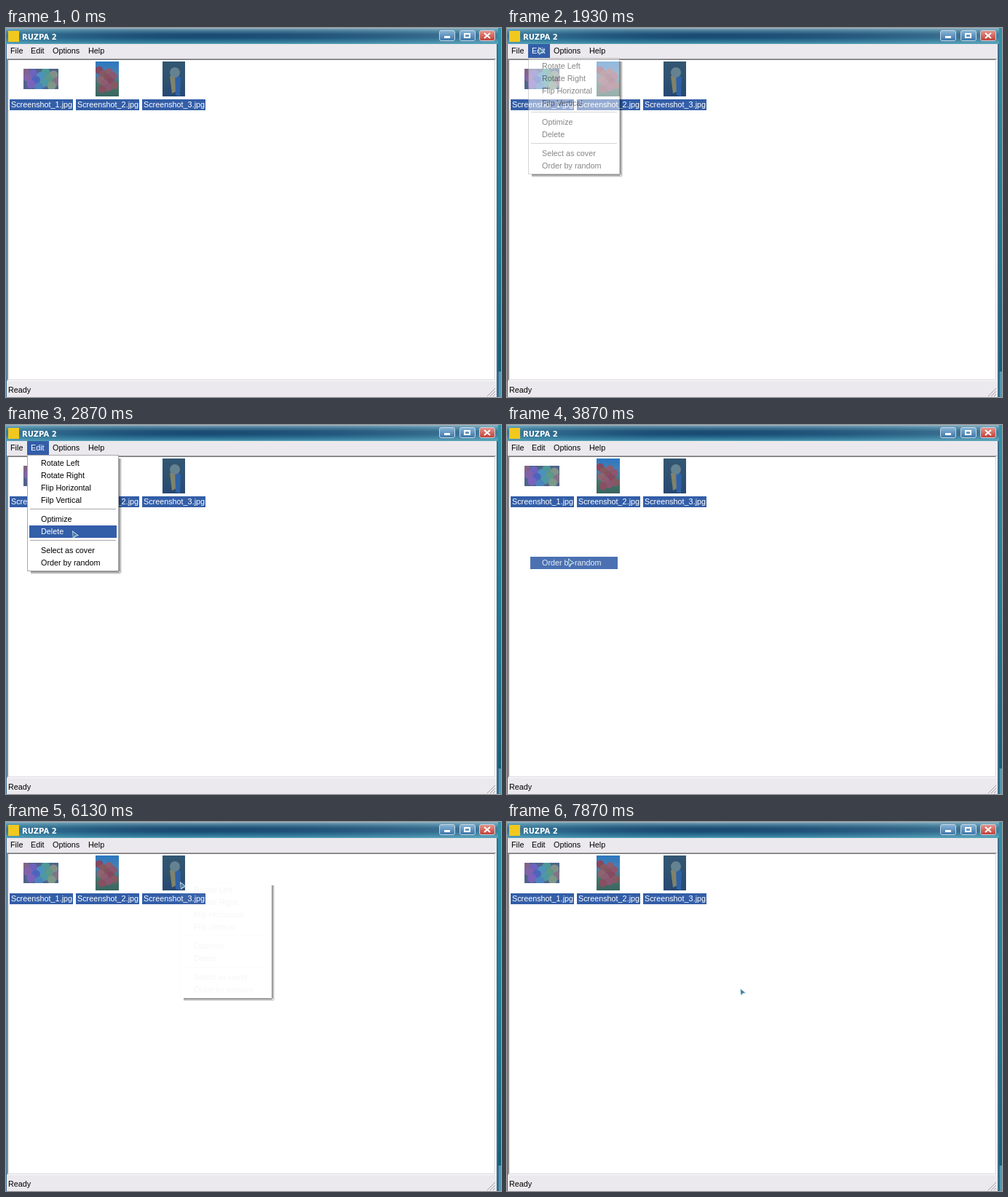
These frames come from a looping animation (680x507 px, 8000 ms). An HTML page with a canvas:

```html
<!DOCTYPE html>
<html lang="en">
<head>
<meta charset="utf-8">
<title>Image manager</title>
<style>
html, body { margin: 0; height: 100%; overflow: hidden; }
canvas { display: block; }
</style>
</head>
<body>
<canvas id="stage" width="680" height="507"></canvas>
<script>
const ctx = document.getElementById('stage').getContext('2d');
const LOOP = 8000, FPS = 15;
const FACE = '#ebe9ed', SELECT = '#335ea8', LINE = '#a7a6aa';
const ROW = 17, GAP = 9, MENU_W = 126, MENU_H = 160, SHADOW = 4;

const GROUPS = [
  ['Rotate Left', 'Rotate Right', 'Flip Horizontal', 'Filp Vertical'],
  ['Optimize', 'Delete'],
  ['Select as cover', 'Order by random']
];
const ITEMS = GROUPS.flatMap((group, g) => group.map(label => ({ label, g })))
  .map(({ label, g }, i) => ({ label, top: 3 + i * ROW + g * GAP }));
const CHOSEN = ITEMS.at(-1);

// Pointer moves in steps; each slows down along a curve bent towards `via`
const START = [680, 507];
const MOVES = [
  { from: 5, to: 18, at: [45, 19], via: [200, 60] },
  { from: 18, to: 21, at: [45, 34] },
  { from: 21, to: 23, at: [43, 26] },
  { from: 35, to: 53, at: [84, 183], via: [110, 130] },
  { from: 73, to: 81, at: [262, 95], via: [81, 192] },
  { from: 81, to: 85, at: [239, 82] },
  { from: 97, to: 107, at: [320, 228], via: [345, 264] }
];
// A menu fades in over `fade` steps; the chosen item lingers for `linger` steps
const MENUS = [
  { x: 29, y: 41, open: 25, fade: 7, close: 58, linger: 5 },
  { x: 239, y: 82, open: 92, fade: 3, close: 114, linger: 4 }
];

function rect(x, y, w, h, fill) {
  ctx.fillStyle = fill;
  ctx.fillRect(x, y, w, h);
}

function text(str, x, y, fill = '#000', font = '10.8px "Liberation Sans", sans-serif') {
  ctx.font = font;
  ctx.fillStyle = fill;
  ctx.fillText(str, x, y);
}

function shape(fill, ...points) {
  ctx.fillStyle = fill;
  ctx.beginPath();
  points.forEach(([x, y]) => ctx.lineTo(x, y));
  ctx.closePath();
  ctx.fill();
}

function dot(x, y, r, fill) {
  ctx.fillStyle = fill;
  ctx.beginPath();
  ctx.arc(x, y, r, 0, 7);
  ctx.fill();
}

// Evenly scattered dots inside a box
function scatter(n, x, y, w, h, r, color) {
  for (let i = 0; i < n; i++) dot(x + w * (i * .618 % 1), y + h * i / (n - 1), r, color(i));
}

function vertical(y0, y1, ...colors) {
  const g = ctx.createLinearGradient(0, y0, 0, y1);
  colors.forEach((color, i) => g.addColorStop(i / (colors.length - 1), color));
  return g;
}

function captionButton(x, top, bottom) {
  ctx.beginPath();
  ctx.roundRect(x + .5, 3.5, 21, 14, 2.5);
  ctx.fillStyle = vertical(3, 18, top, bottom);
  ctx.fill();
  ctx.strokeStyle = '#c3d7e5';
  ctx.lineWidth = 1;
  ctx.stroke();
}

function titleBar() {
  rect(0, 0, 676, 22, vertical(0, 22, '#9fb9c6', '#457d9a', '#1d4d74', '#1a5078', '#2c7798', '#58a4ba'));
  const sheen = ctx.createLinearGradient(0, 0, 676, 0);
  sheen.addColorStop(0, '#58a5c080');
  sheen.addColorStop(.4, '#10366020');
  sheen.addColorStop(1, '#79b8cc70');
  rect(0, 1, 676, 20, sheen);
  rect(3, 4, 15, 15, '#f2c81e');
  text('RUZPA 2', 22, 16, '#fff', 'bold 10px "DejaVu Sans", sans-serif');
  captionButton(595, '#8db8d8', '#3872a8');
  captionButton(623, '#8db8d8', '#3872a8');
  captionButton(650, '#e89a90', '#bd3a32');
  rect(602, 11, 8, 3, '#fff');
  ctx.strokeStyle = '#fff';
  ctx.lineWidth = 2;
  ctx.strokeRect(630, 8, 7, 5);
  ctx.beginPath();
  ctx.moveTo(657, 7); ctx.lineTo(665, 14);
  ctx.moveTo(665, 7); ctx.lineTo(657, 14);
  ctx.stroke();
}

// Selected thumbnail: the picture under a half-transparent selection tint
function thumbnail(i, w, h, paint) {
  const left = 5 + i * 91, x = Math.round(left + 43 - w / 2), y = 70 - h / 2;
  ctx.save();
  ctx.beginPath();
  ctx.rect(x, y, w, h);
  ctx.clip();
  paint(x, y);
  rect(x, y, w, h, SELECT + '80');
  ctx.restore();
  rect(left, 98, 87, 15, SELECT);
  text(`Screenshot_${i + 1}.jpg`, left + 2, 109, '#fff');
}

function thumbnails() {
  thumbnail(0, 48, 28, (x, y) => {
    rect(x, y, 48, 28, '#6a6a6a');
    scatter(13, x + 2, y + 3, 46, 22, 6, i => `hsl(${i * 137}, 55%, 62%)`);
  });
  thumbnail(1, 32, 48, (x, y) => {
    rect(x, y, 32, 48, vertical(y, y + 48, '#2592d6', '#5aa5c8', '#5c8a2c', '#3f6e18'));
    scatter(11, x + 5, y + 12, 22, 26, 5.5, i => `hsl(${8 + i % 3 * 5}, 78%, ${48 + i % 2 * 8}%)`);
  });
  thumbnail(2, 31, 48, (x, y) => {
    rect(x, y, 31, 48, vertical(y, y + 48, '#33503c', '#2c4638', '#1d3340'));
    shape('#d0a92c', [x + 10, y + 20], [x + 19, y + 18], [x + 21, y + 40], [x + 13, y + 44]);
    shape('#2a67a8', [x + 17, y + 16], [x + 25, y + 22], [x + 24, y + 48], [x + 18, y + 46]);
    dot(x + 17, y + 15, 7, '#9aa87a');
  });
}

function windowFrame(editHot) {
  rect(0, 0, 680, 507, FACE);
  titleBar();
  rect(0, 22, 1, 485, '#3d6c96');
  if (editHot) rect(29, 22, 30, 19, SELECT);
  [['File', 6], ['Edit', 34], ['Options', 64], ['Help', 113]].forEach(([label, x]) =>
    text(label, x, 35, editHot && label === 'Edit' ? '#fff' : '#000'));

  rect(1, 42, 672, 443, '#9d9da1');
  rect(2, 43, 671, 442, '#fff');
  rect(2, 43, 670, 441, '#d6d4d9');
  rect(2, 43, 669, 440, '#77767c');
  rect(3, 44, 668, 439, '#fff');

  text('Ready', 3, 501);
  ctx.strokeStyle = '#a3a1a8';
  ctx.lineWidth = 1;
  ctx.beginPath();
  for (let d = 3; d < 12; d += 4) {
    ctx.moveTo(672 - d, 506);
    ctx.lineTo(672, 506 - d);
  }
  ctx.stroke();

  rect(674, 22, 3, 485, '#386b8c');
  rect(676, 0, 4, 472, vertical(0, 472, '#3293a8', '#1f8096', '#136078'));
  rect(677, 472, 3, 35, '#4f9bb2');
}

function menuItem(menu, { label, top }, hot) {
  const y = menu.y + top;
  if (hot) rect(menu.x + 3, y, 120, ROW, SELECT);
  text(label, menu.x + 19, y + 12, hot ? '#fff' : '#000');
}

function openMenu(menu, age, pointer) {
  const { x, y } = menu;
  for (let i = 0; i < SHADOW; i++) {
    const shade = `rgba(0,0,0,${.44 * (1 - i / SHADOW)})`;
    rect(x + MENU_W + i, y + 5, 1, MENU_H - 5 + i, shade);
    rect(x + 5, y + MENU_H + i, MENU_W - 5 + i, 1, shade);
  }
  ctx.globalAlpha = Math.min(1, (age + .5) / (menu.fade - .5)) ** 2;
  rect(x + 1, y + 1, MENU_W - 2, MENU_H - 2, '#fff');
  ctx.strokeStyle = LINE;
  ctx.lineWidth = 1;
  ctx.strokeRect(x + .5, y + .5, MENU_W - 1, MENU_H - 1);
  ITEMS.forEach((item, i) => {
    const dy = pointer.y - y - item.top;
    menuItem(menu, item, pointer.x > x + 2 && dy >= 0 && dy < ROW);
    if (i && item.top - ITEMS[i - 1].top > ROW) rect(x + 4, y + item.top - 6, 118, 1, LINE);
  });
}

function drawMenu(menu, step, pointer) {
  const sinceClose = step - menu.close;
  if (step >= menu.open && sinceClose < 0) {
    openMenu(menu, step - menu.open, pointer);
  } else if (sinceClose >= 0 && sinceClose < menu.linger) {
    ctx.globalAlpha = .88 * (1 - sinceClose / menu.linger);
    menuItem(menu, CHOSEN, true);
  }
  ctx.globalAlpha = 1;
}

function pointerAt(step) {
  let pos = START;
  for (const { from, to, at, via = at } of MOVES) {
    if (step <= from) break;
    const u = 1 - (1 - Math.min(1, (step - from) / (to - from))) ** 2;
    pos = pos.map((p, i) => (1 - u) ** 2 * p + 2 * u * (1 - u) * via[i] + u * u * at[i]);
  }
  return { x: Math.round(pos[0]), y: Math.round(pos[1]) };
}

function drawPointer({ x, y }) {
  shape('#d3e3eb', [x, y], [x + 9, y + 7], [x + 5, y + 8], [x + 1, y + 11]);
  shape('#3f7e9d', [x + 1, y + 2], [x + 7, y + 6.5], [x + 4, y + 7], [x + 1.5, y + 9.5]);
}

function draw(now) {
  const step = Math.floor((now % LOOP + 4) * FPS / 1000);
  const pointer = pointerAt(step);
  const hover = pointerAt(step - .7); // highlights trail the pointer a little
  const overEdit = pointer.x >= 29 && pointer.x < 59 && pointer.y >= 22 && pointer.y < 41;
  const [editMenu] = MENUS;
  windowFrame(step < editMenu.close && (overEdit || step >= editMenu.open));
  thumbnails();
  MENUS.forEach(menu => drawMenu(menu, step, hover));
  drawPointer(pointer);
}

const start = performance.now();
function tick() {
  draw(performance.now() - start);
  requestAnimationFrame(tick);
}
tick();
</script>
</body>
</html>
```
